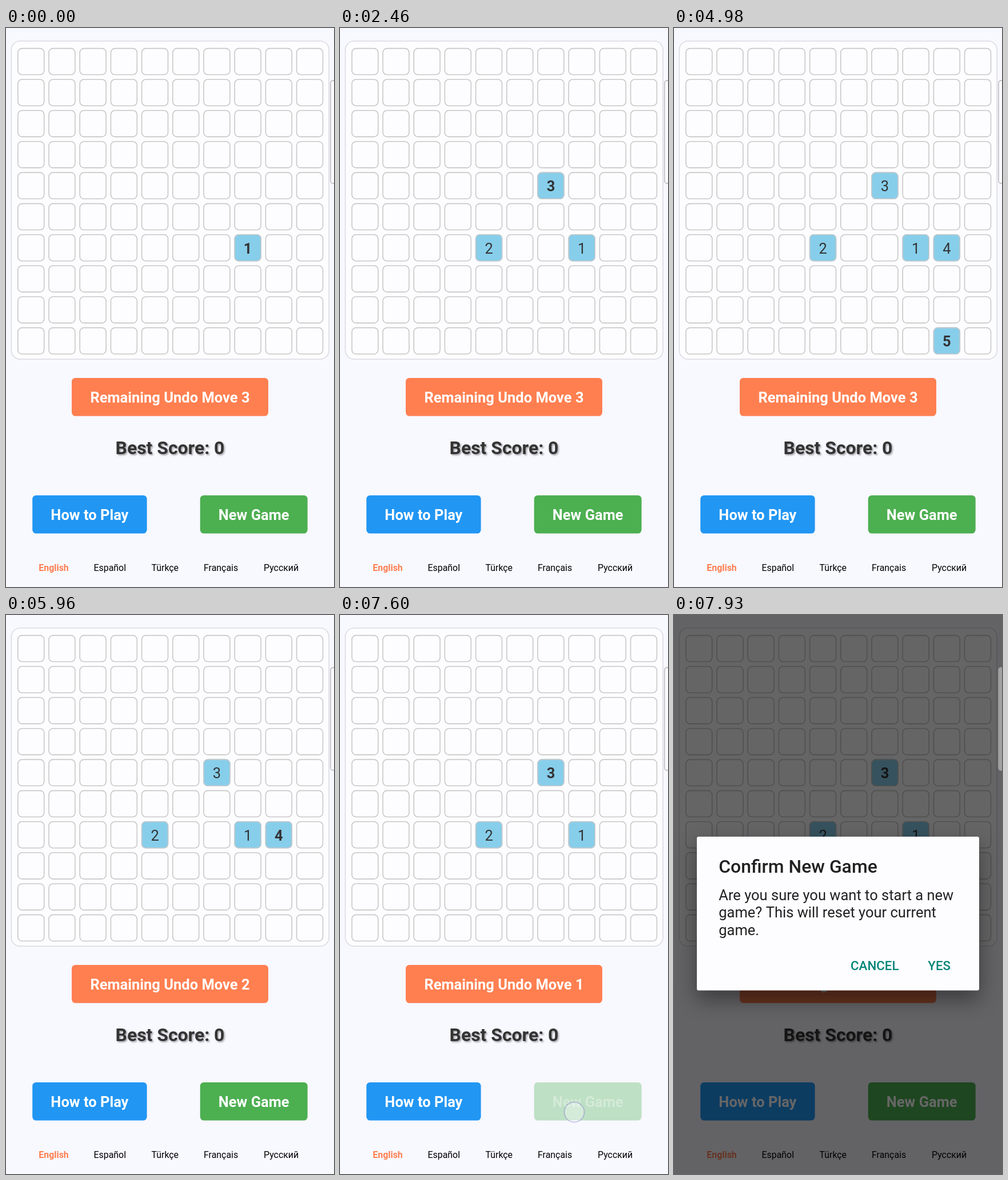
An HTML page with a canvas that plays this animation: 574 px wide and 976 px high, repeating every 8 s.

```html
<!DOCTYPE html>
<html lang="en">
<head>
<meta charset="utf-8">
<title>Number board</title>
<style>
  html, body { margin: 0; width: 100%; height: 100%; overflow: hidden; background: #f8f8ff; }
  canvas { display: block; }
</style>
</head>
<body>
<canvas id="stage" width="574" height="976"></canvas>
<script>
const ctx = document.getElementById('stage').getContext('2d');
const LOOP = 8000, SIZE = 47.5, PITCH = 54.2;

// Board squares in the order they are numbered: [column, row]
const path = [[7, 6], [4, 6], [6, 4], [8, 6], [8, 9]];

// Finger taps: a number as target is an index into path
const taps = [
  { down: 50, up: 300, x: 267, y: 389, target: 1 },
  { down: 1260, up: 1500, x: 378, y: 281, target: 2 },
  { down: 2630, up: 2920, x: 480, y: 388, target: 3 },
  { down: 3940, up: 4290, x: 480, y: 549, target: 4 },
  { down: 5090, up: 5330, x: 300, y: 652, target: 'undo' },
  { down: 6070, up: 6420, x: 300, y: 652, target: 'undo' },
  { down: 7390, up: 7640, x: 410, y: 868, target: 'new' },
];

const clamp = v => Math.min(1, Math.max(0, v));
const easeInOut = p => p < .5 ? 2 * p * p : 1 - 2 * (1 - p) ** 2;
const easeOut = p => 1 - (1 - p) ** 2;

function box(x, y, w, h, r, fill, border, line = 1.6) {
  ctx.beginPath();
  ctx.roundRect(x, y, w, h, r);
  ctx.fillStyle = fill;
  ctx.fill();
  if (!border) return;
  ctx.beginPath();
  ctx.roundRect(x + line / 2, y + line / 2, w - line, h - line, r - line / 2);
  ctx.lineWidth = line;
  ctx.strokeStyle = border;
  ctx.stroke();
}

function text(str, x, y, size, weight, color, align = 'left') {
  ctx.font = `${weight} ${size}px Roboto, sans-serif`;
  ctx.textAlign = align;
  ctx.fillStyle = color;
  ctx.fillText(str, x, y);
}

function button(label, x, y, w, color, alpha = 1) {
  ctx.globalAlpha = alpha;
  box(x, y, w, 66.5, 6.4, color);
  text(label, x + w / 2, y + 43, 25.5, 700, '#fff', 'center');
  ctx.globalAlpha = 1;
}

// Pressed controls fade to 20 % and come back after the release
function pressAlpha(target, t) {
  const tap = taps.findLast(p => p.target === target && t >= p.down);
  if (!tap) return 1;
  const lowered = 1 - .8 * easeInOut(clamp((t - tap.down - 105) / 150));
  return t < tap.up ? lowered : .2 + .8 * easeInOut(clamp((t - tap.up) / 250));
}

function drawBoard(t, count) {
  box(8.5, 22, 557.5, 557, 16, '#fdfdff', '#dadae4');
  for (let row = 0; row < 10; row++) {
    for (let col = 0; col < 10; col++) {
      const x = 20 + col * PITCH, y = 34.8 + row * PITCH;
      const index = path.findIndex(([c, r]) => c === col && r === row);
      const filled = index >= 0 && index < count;
      ctx.globalAlpha = index < 0 ? 1 : pressAlpha(index, t);
      box(x, y, SIZE, SIZE, 8, filled ? '#87ceeb' : '#fdfdff', '#c8c8c8');
      if (filled) {
        const weight = index === count - 1 ? 700 : 400;
        text(index + 1, x + SIZE / 2, y + 33.5, 25.5, weight, '#333', 'center');
      }
      ctx.globalAlpha = 1;
    }
  }
}

function drawControls(t, undoLeft) {
  button('Remaining Undo Move ' + undoLeft, 115, 611, 344, '#ff7f50', pressAlpha('undo', t));
  ctx.save();
  ctx.shadowColor = 'rgba(0,0,0,.35)';
  ctx.shadowBlur = 3;
  ctx.shadowOffsetX = ctx.shadowOffsetY = 2;
  text('Best Score: 0', 287, 744, 31.9, 700, '#333', 'center');
  ctx.restore();
  button('How to Play', 46.2, 816, 200.4, '#2196f3');
  button('New Game', 339.7, 816, 188, '#4caf50', pressAlpha('new', t));

  text('English', 57.3, 947.5, 15.9, 700, '#ff7f50');
  [['Español', 153.5], ['Türkçe', 254.5], ['Français', 346], ['Русский', 451]]
    .forEach(([name, x]) => text(name, x, 947.5, 15.9, 400, '#000'));
}

function drawTouch(t) {
  const tap = taps.find(p => t >= p.down && t < p.up);
  if (!tap) return;
  ctx.beginPath();
  ctx.arc(tap.x, tap.y, 17.5, 0, 7);
  ctx.fillStyle = 'rgba(255,255,255,.35)';
  ctx.fill();
  ctx.lineWidth = 2;
  ctx.strokeStyle = 'rgba(130,120,200,.4)';
  ctx.stroke();
}

function drawDialog(t) {
  const p = clamp((t - 7650) / 130);
  if (!p) return;
  ctx.fillStyle = `rgba(0,0,0,${.6 * p})`;
  ctx.fillRect(0, 0, 574, 976);

  const scale = .9 + .1 * easeOut(p);
  ctx.save();
  ctx.globalAlpha = p;
  ctx.translate(287, 521);
  ctx.scale(scale, scale);
  ctx.translate(-287, -521);
  ctx.save();
  ctx.shadowColor = 'rgba(0,0,0,.4)';
  ctx.shadowBlur = 36;
  ctx.shadowOffsetY = 16;
  box(40, 387, 494, 268.5, 3.2, '#fdfdff');
  ctx.restore();
  text('Confirm New Game', 78.3, 449.5, 31.9, 500, '#212121');
  ['Are you sure you want to start a new', 'game? This will reset your current', 'game.']
    .forEach((line, i) => text(line, 78.3, 498 + i * 30.3, 25.5, 400, '#212121'));
  text('CANCEL', 309, 619.5, 22.3, 500, '#008577');
  text('YES', 444.3, 619.5, 22.3, 500, '#008577');
  ctx.restore();
}

function draw(t) {
  const done = taps.filter(p => t >= p.up);
  const undone = done.filter(p => p.target === 'undo').length;
  const placed = done.filter(p => p.target > 0).length;

  ctx.fillStyle = '#f8f8ff';
  ctx.fillRect(0, 0, 574, 976);
  drawBoard(t, 1 + placed - undone);
  drawControls(t, 3 - undone);
  drawDialog(t);
  // Edge handle of the phone, above everything but the finger
  box(567.3, 91, 20, 181, 5, 'rgba(255,255,255,.4)', 'rgba(150,150,150,.7)', 1.4);
  drawTouch(t);
}

const start = performance.now();
function frame() {
  draw((performance.now() - start) % LOOP);
  requestAnimationFrame(frame);
}
frame();
</script>
</body>
</html>
```
